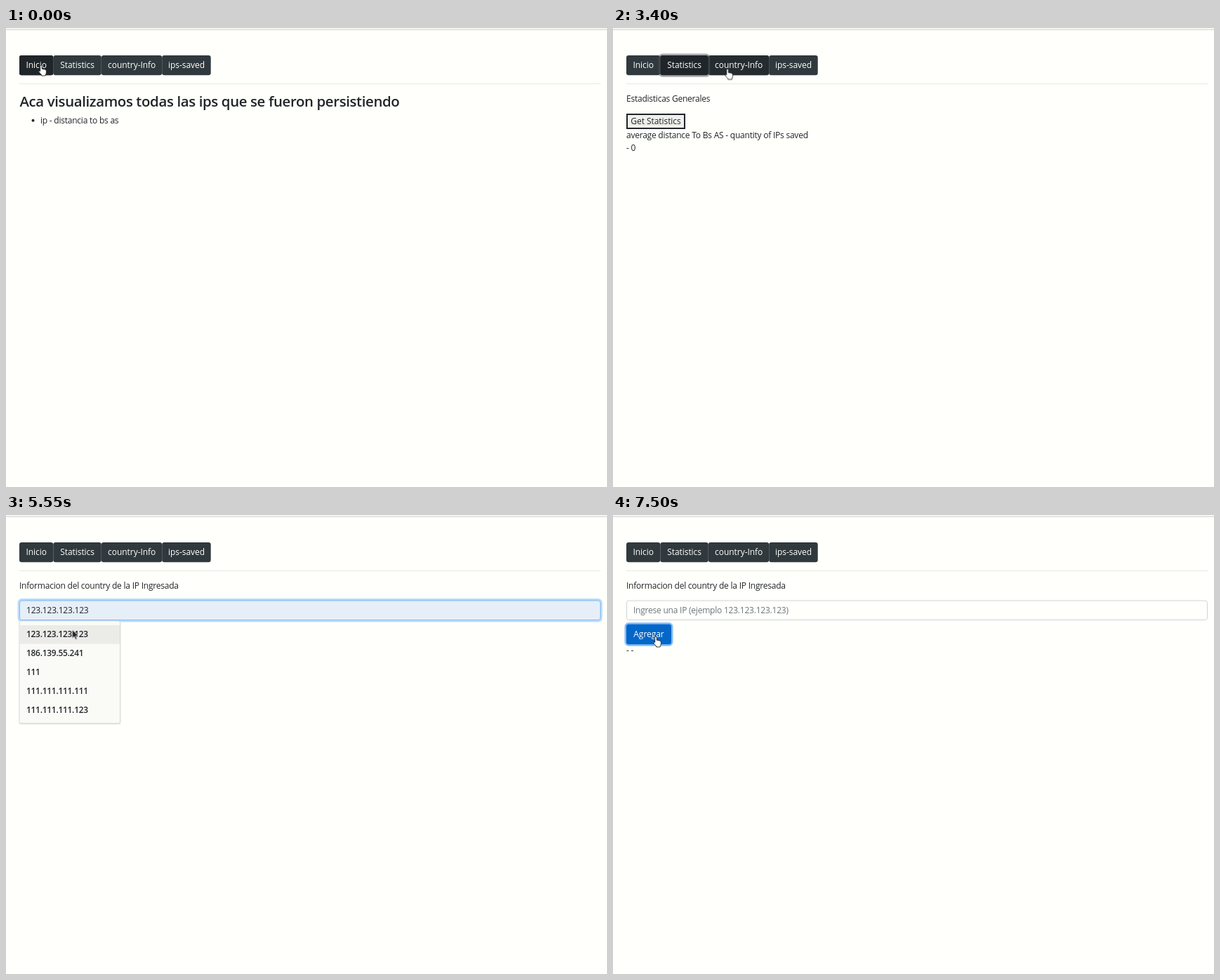
Recreate the animation shown at these times as an HTML page. Size 856 px wide and 654 px high, loop 8000 ms.

```html
<!DOCTYPE html>
<html lang="es">
<head>
<meta charset="utf-8">
<title>IP demo</title>
<style>
html, body { margin: 0; width: 100%; height: 100%; overflow: hidden; background: #fffffb; }
svg { display: block; width: 856px; height: 654px; font: 12px "Open Sans", "Noto Sans", sans-serif; letter-spacing: -.019em; fill: #212529; }
h1, .title { font-weight: 600; letter-spacing: -.018em; }
.label { text-anchor: middle; letter-spacing: -.004em; }
.light { fill: #fffffb; }
.base { fill: #30393d; }
.dark { fill: #20252a; }
.ring { fill: none; stroke: #52585d; stroke-opacity: .5; stroke-width: 2.6; }
.blue { stroke: #007bff; stroke-opacity: .27; }
.hint { fill: #6c757d; }
.list { font-weight: 600; font-size: 11.9px; }

/* 1% of the loop is 80 ms */
.cut { animation: 8s step-end infinite; }
.fade { animation: 8s linear infinite; }

#saved { animation-name: saved; }
#home { animation-name: home; }
#stats { animation-name: stats; }
#country { animation-name: country; }
@keyframes saved { 0% { opacity: 1 } 2.5%, 100% { opacity: 0 } }
@keyframes home { 0% { opacity: 0 } 2.5% { opacity: 1 } 25.625%, 100% { opacity: 0 } }
@keyframes stats { 0% { opacity: 0 } 25.625% { opacity: 1 } 46.25%, 100% { opacity: 0 } }
@keyframes country { 0% { opacity: 0 } 46.25%, 100% { opacity: 1 } }

#dark1 { animation-name: dark1; }
#dark2 { animation-name: dark2; }
#dark3 { animation-name: dark3; }
#ring1 { animation-name: ring1; }
#ring2 { animation-name: ring2; }
#ring3 { animation-name: ring3; }
@keyframes dark1 { 0%, 24.4% { opacity: 1 } 26.25%, 100% { opacity: 0 } }
@keyframes dark2 { 0%, 19.6% { opacity: 0 } 21.5%, 45% { opacity: 1 } 46.9%, 100% { opacity: 0 } }
@keyframes dark3 { 0%, 41.5% { opacity: 0 } 43.1%, 56.9% { opacity: 1 } 58.75%, 100% { opacity: 0 } }
@keyframes ring1 { 0%, 1.2% { opacity: 0 } 3.1%, 24.4% { opacity: 1 } 26.25%, 100% { opacity: 0 } }
@keyframes ring2 { 0%, 24.4% { opacity: 0 } 26.25%, 45% { opacity: 1 } 46.9%, 100% { opacity: 0 } }
@keyframes ring3 { 0%, 45% { opacity: 0 } 46.9%, 56.9% { opacity: 1 } 58.75%, 100% { opacity: 0 } }

#focus { animation-name: focus; }
#fill { animation-name: filled; }
#hint { animation-name: hint; }
#row1, #value1 { animation-name: first; }
#row2 { animation-name: second; }
#value2 { animation-name: value; }
#caret { animation-name: caret; }
@keyframes focus { 0%, 56.9% { opacity: 0 } 58.75%, 80.5% { opacity: 1 } 81.25%, 100% { opacity: 0 } }
@keyframes filled { 0% { opacity: 0 } 68.75% { opacity: 1 } 91.25%, 100% { opacity: 0 } }
@keyframes hint { 0% { opacity: 1 } 68.75% { opacity: 0 } 91.25%, 100% { opacity: 1 } }
@keyframes first { 0% { opacity: 0 } 68.75% { opacity: 1 } 71.1%, 100% { opacity: 0 } }
@keyframes second { 0% { opacity: 0 } 71.1%, 100% { opacity: 1 } }
@keyframes value { 0% { opacity: 0 } 71.1% { opacity: 1 } 91.25%, 100% { opacity: 0 } }
@keyframes caret { 0% { opacity: 0 } 74.375% { opacity: 1 } 80.6%, 100% { opacity: 0 } }

#menu { transform-origin: 90.5px 224px; animation-name: menu; }
@keyframes menu {
  0%, 58.75% { opacity: 0; transform: none }
  60.6%, 74.4% { opacity: 1; transform: none }
  75.6% { opacity: .09; transform: scale(.965) }
  76.25%, 100% { opacity: 0; transform: scale(.96) }
}

#add { fill: #057cf7; animation-name: add; }
#addRing { animation-name: addRing; }
@keyframes add { 0%, 86.2% { fill: #057cf7 } 87.5%, 90% { fill: #0069d9 } 91.9%, 100% { fill: #0367c9 } }
@keyframes addRing { 0%, 90% { opacity: 0 } 91.9%, 100% { opacity: 1 } }

#cursor { animation-name: move; }
#hand { animation-name: hand; }
#arrow { animation-name: arrow; }
@keyframes move {
  0%, 2.5% { transform: translate(50px, 53px) }
  5%, 11.24% { transform: translate(338px, 290px) }
  11.25%, 13.1% { transform: translate(282px, 246px) }
  16.25% { transform: translate(146.5px, 109.5px) }
  18.75% { transform: translate(122px, 72px) }
  23.1%, 30% { transform: translate(122.5px, 47px) }
  34.4%, 35% { transform: translate(75px, 126px) }
  40% { transform: translate(125px, 85px) }
  43.1%, 48.75% { transform: translate(172px, 52px) }
  51.9% { transform: translate(147.5px, 83px) }
  53.75%, 55% { transform: translate(112px, 117px) }
  56.9%, 66.9% { transform: translate(108.5px, 135.5px) }
  71.9%, 75.7% { transform: translate(80px, 191.5px) }
  78.1%, 83.1% { transform: translate(222px, 212px) }
  87.5%, 100% { transform: translate(61px, 173px) }
}
@keyframes hand {
  0%, 19.6%, 34.2%, 41.7%, 86.9%, 100% { opacity: 1 }
  2.65%, 31.1%, 35.5%, 50.1% { opacity: 0 }
}
@keyframes arrow {
  0%, 19.6%, 34.2%, 41.7%, 86.9%, 100% { opacity: 0 }
  2.65%, 31.1%, 35.5%, 50.1% { opacity: 1 }
}
</style>
</head>
<body>
<svg viewBox="0 0 856 654">
  <rect width="856" height="654" fill="#fffffb"/>
  <rect width="856" height="2" fill="#f5f5f2"/>
  <rect y="2" width="856" height="1" fill="#d6d6d3"/>
  <rect x="19" y="79" width="828" height="1" fill="#e7e7e4"/>

  <g class="base">
    <rect x="19" y="39" width="48.3" height="28.3" rx="3.2"/>
    <rect x="67.3" y="39" width="68.5" height="28.3" rx="3.2"/>
    <rect x="135.8" y="39" width="86.4" height="28.3" rx="3.2"/>
    <rect x="222.2" y="39" width="69.5" height="28.3" rx="3.2"/>
  </g>
  <g class="dark">
    <rect id="dark1" class="fade" x="19" y="39" width="48.3" height="28.3" rx="3.2"/>
    <rect id="dark2" class="fade" x="67.3" y="39" width="68.5" height="28.3" rx="3.2"/>
    <rect id="dark3" class="fade" x="135.8" y="39" width="86.4" height="28.3" rx="3.2"/>
  </g>
  <rect id="ring1" class="ring fade" x="17.8" y="37.8" width="50.7" height="30.7" rx="4.4"/>
  <rect id="ring2" class="ring fade" x="66.1" y="37.8" width="70.9" height="30.7" rx="4.4"/>
  <rect id="ring3" class="ring fade" x="134.6" y="37.8" width="88.8" height="30.7" rx="4.4"/>
  <g class="label light">
    <text x="43.2" y="57.3">Inicio</text>
    <text x="101.6" y="57.3">Statistics</text>
    <text x="179.2" y="57.3">country-Info</text>
    <text x="257" y="57.3">ips-saved</text>
  </g>

  <g id="saved" class="cut">
    <text class="title" x="19.5" y="112" font-size="20.4">Aca visualizamos todas las ips que se fueron persistiendo</text>
    <circle cx="38.5" cy="131.8" r="2"/>
    <text x="49" y="135.5">ip - distancia to bs as</text>
  </g>

  <g id="home" class="cut">
    <text class="title" x="19.5" y="120" font-size="29.1">Esta es la pagina de inicio</text>
  </g>

  <g id="stats" class="cut">
    <text x="19" y="105">Estadisticas Generales</text>
    <rect x="20" y="123" width="82" height="20" fill="#efefec" stroke="#212529" stroke-width="2"/>
    <text class="label" x="61" y="137">Get Statistics</text>
    <text x="19" y="157">average distance To Bs AS - quantity of IPs saved</text>
    <text x="19" y="175">- 0</text>
  </g>

  <g id="country" class="cut">
    <text x="19" y="105">Informacion del country de la IP Ingresada</text>
    <rect x="19.5" y="122" width="827" height="27.5" rx="3.2" fill="#fffffb" stroke="#ced4da"/>
    <rect id="fill" class="cut" x="20" y="122.5" width="826" height="26.5" rx="2.8" fill="#e6eff8"/>
    <g id="focus" class="fade">
      <rect class="ring blue" x="17.9" y="120.4" width="830.2" height="30.7" rx="4.4"/>
      <rect x="19.5" y="122" width="827" height="27.5" rx="3.2" fill="none" stroke="#80bdf8"/>
    </g>
    <text id="hint" class="hint cut" x="29" y="140">Ingrese una IP (ejemplo 123.123.123.123)</text>
    <text id="value1" class="cut" x="29" y="140">123.123.123.123</text>
    <text id="value2" class="cut" x="29" y="140">186.139.55.241</text>
    <rect id="caret" class="cut" x="112" y="129" width="1" height="13.5"/>

    <rect id="addRing" class="ring blue fade" style="stroke-opacity:.5" x="17.8" y="154.6" width="66.4" height="30.8" rx="4.4"/>
    <rect id="add" class="fade" x="19" y="155.8" width="64" height="28.4" rx="3.2"/>
    <text class="label light" x="51" y="174.3">Agregar</text>
    <text x="19" y="197">- -</text>

    <g id="menu" class="fade">
      <rect x="18.5" y="152" width="145" height="146.5" rx="3" fill="#000" opacity=".1"/>
      <rect x="19" y="151" width="143.5" height="145.8" rx="2.5" fill="#fafaf7" stroke="#d0d0cd" stroke-width=".7"/>
      <rect id="row1" class="cut" x="19.5" y="157" width="142.5" height="26.7" fill="#ebebe8"/>
      <rect id="row2" class="cut" x="19.5" y="183.7" width="142.5" height="26.7" fill="#ebebe8"/>
      <g class="list">
        <text x="29" y="174.3">123.123.123.123</text>
        <text x="29" y="201.1">186.139.55.241</text>
        <text x="29" y="227.9">111</text>
        <text x="29" y="254.7">111.111.111.111</text>
        <text x="29" y="281.5">111.111.111.123</text>
      </g>
    </g>
  </g>

  <g id="cursor" class="fade">
    <path id="arrow" class="cut" d="M0 0V12.4L2.8 9.8 4.8 14.2 6.8 13.3 4.9 9H8.8Z" fill="#222" stroke="#fffffb" stroke-width=".7"/>
    <path id="hand" class="cut" d="M-1.3 8.4V1.2A1.3 1.3 0 0 1 1.3 1.2V5.2L5.4 6Q7.4 6.4 7.4 8.2V10.6Q7.2 12.4 6.2 13.8V15H.6V13.8Q-1.6 11.6-3.5 9Q-3.8 7.2-1.3 8.4Z" fill="#fffffb" stroke="#222" stroke-width=".9"/>
  </g>
</svg>
</body>
</html>
```
